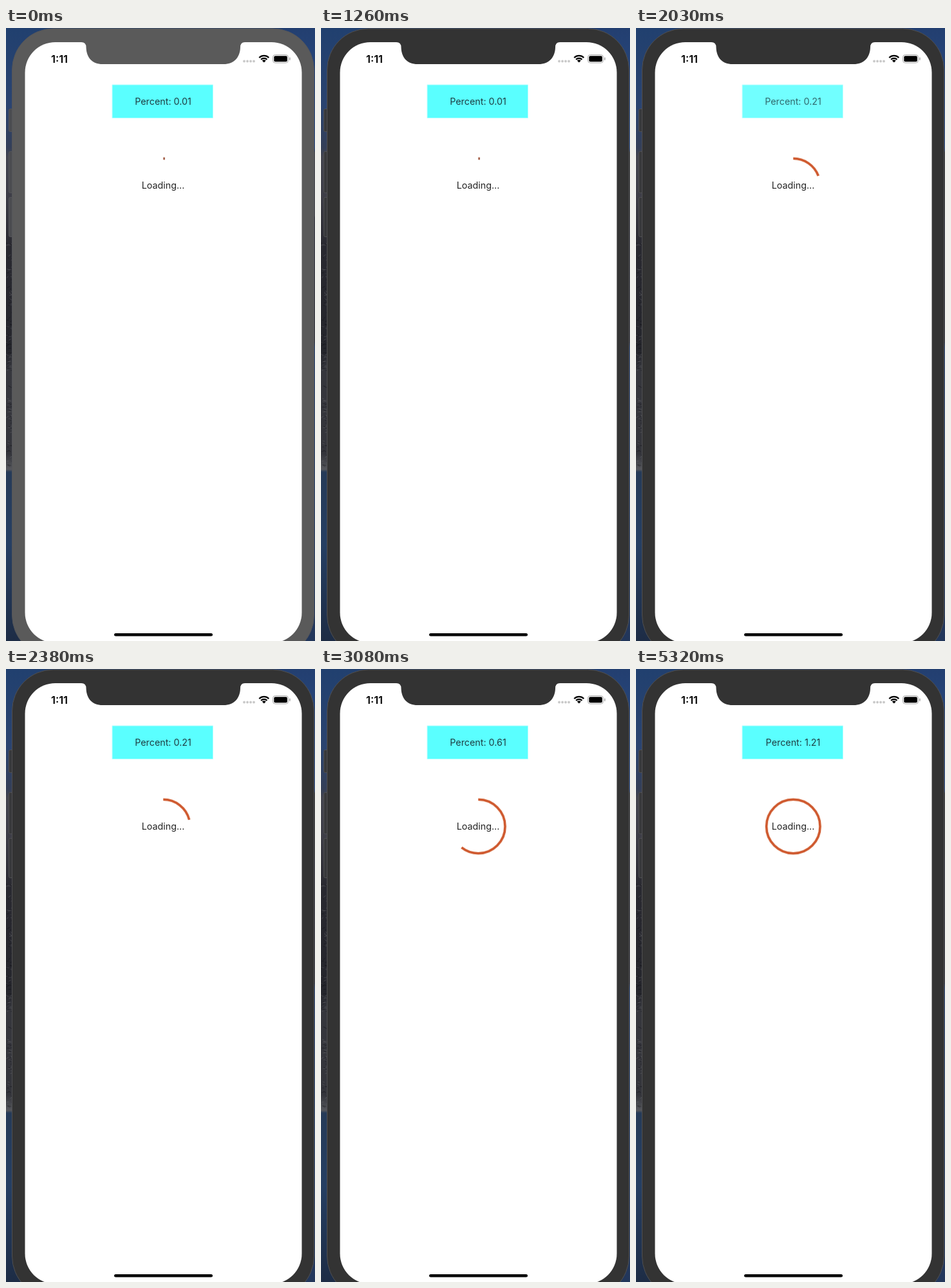
An HTML page with a canvas that plays this animation: 480x950 px, repeating every 5390 ms.

```html
<!DOCTYPE html>
<html lang="en">
<head>
<meta charset="utf-8">
<title>Circular progress</title>
<style>
  html, body { margin: 0; width: 100%; height: 100%; overflow: hidden; background: #26364f; }
  canvas { display: block; width: 480px; height: 950px; }
</style>
</head>
<body>
<canvas id="stage" width="480" height="950"></canvas>
<script>
const ctx = document.getElementById('stage').getContext('2d');
const LOOP = 5390, STEP = 70;
const FOCUS_AT = 1190;                              // simulator window becomes active
const TAPS = [1813, 2483, 2750, 3240, 3690, 4115];  // moments the button is released
const DOWN = -80, UP = 60, FADE_IN = 250, DIM = 0.2;
const SPRING = 18.5;

const clamp = x => Math.min(1, Math.max(0, x));
const mix = (a, b, k) => a + (b - a) * k;
const ease = x => {
  x = clamp(x);
  return x < 0.5 ? 2 * x * x : 1 - 2 * (1 - x) * (1 - x);
};

function percentAt(t) {
  return 0.01 + 0.2 * TAPS.filter(tap => t >= tap).length;
}

// Each tap adds one critically damped spring.
function arcAt(t) {
  let value = 0.01;
  TAPS.forEach((tap, i) => {
    const k = SPRING * Math.max(0, t - tap) / 1000;
    const change = Math.min(1, 0.21 + 0.2 * i) - Math.min(1, 0.01 + 0.2 * i);
    value += change * (1 - (1 + k) * Math.exp(-k));
  });
  return value;
}

function opacityAt(t) {
  const rise = (i, at) => i < 0 ? 1 : mix(DIM, 1, ease((at - TAPS[i] - UP) / FADE_IN));
  const i = TAPS.filter(tap => t >= tap + DOWN).length - 1;
  if (i < 0 || t >= TAPS[i] + UP) return rise(i, t);
  const start = TAPS[i] + DOWN;
  return mix(rise(i - 1, start), DIM, ease((t - start) / (UP - DOWN)));
}

function box(x, y, w, h, r, fill, stroke) {
  ctx.beginPath();
  ctx.roundRect(x, y, w, h, r);
  if (fill) { ctx.fillStyle = fill; ctx.fill(); }
  if (stroke) { ctx.strokeStyle = stroke; ctx.lineWidth = 1; ctx.stroke(); }
}

function label(text, x, y, size, weight, color) {
  ctx.font = `${weight} ${size}px Inter, sans-serif`;
  ctx.textAlign = 'center';
  ctx.fillStyle = color;
  ctx.fillText(text, x, y);
}

function verticalGradient(stops) {
  const g = ctx.createLinearGradient(0, 0, 0, 950);
  stops.forEach(([y, color]) => g.addColorStop(y / 950, color));
  return g;
}

const leftTones = verticalGradient([
  [0, '#21406f'], [120, '#2b4470'], [185, '#343f58'], [200, '#44454f'], [260, '#3e3e47'],
  [340, '#292930'], [500, '#25262c'], [530, '#36373d'], [660, '#34353b'], [684, '#55575c'],
  [688, '#263b58'], [800, '#263f63'], [950, '#1d2c45']
]);
const rightTones = verticalGradient([
  [0, '#233f70'], [185, '#2c4f8c'], [195, '#3a3b45'], [485, '#36373f'],
  [495, '#2b4675'], [700, '#29436d'], [950, '#22365a']
]);

function wallpaper() {
  ctx.fillStyle = leftTones;
  ctx.fillRect(0, 0, 240, 950);
  ctx.fillStyle = rightTones;
  ctx.fillRect(240, 0, 240, 950);
  let seed = 11;
  const rnd = () => (seed = (seed * 16807) % 2147483647) / 2147483647;
  for (let i = 0; i < 130; i++) {
    const x = rnd() * 10, y = 330 + rnd() * 350;
    ctx.strokeStyle = rnd() < 0.5 ? 'rgba(125,125,130,.3)' : 'rgba(12,12,16,.4)';
    ctx.lineWidth = 1;
    ctx.beginPath();
    ctx.moveTo(x, y);
    ctx.lineTo(x + 2 + rnd() * 3, y + rnd() * 6 - 3);
    ctx.stroke();
  }
}

function phone(active) {
  const body = active ? '#333333' : '#5a5a5a';
  const key = active ? '#38393b' : '#4b4c50';
  const rim = active ? '#505052' : '#55565a';
  [[125, 35], [191, 64], [262, 61]].forEach(([y, h]) => box(4.5, y + 0.5, 10, h, 2, key, rim));
  box(470, 191, 10, 102, 2, key);
  box(9.5, 1, 469, 973, 64, body, rim);
  box(29.5, 22, 430, 931, 47, '#ffffff');

  ctx.beginPath();
  ctx.moveTo(117, 21);
  ctx.lineTo(117, 22);
  ctx.quadraticCurveTo(124.5, 22, 124.5, 30);
  ctx.bezierCurveTo(125, 46, 134, 56, 150, 56);
  ctx.lineTo(338, 56);
  ctx.bezierCurveTo(354, 56, 363.5, 46, 364, 30);
  ctx.quadraticCurveTo(364, 22, 371, 22);
  ctx.lineTo(371, 21);
  ctx.fillStyle = body;
  ctx.fill();
}

function statusBar() {
  label('1:11', 83, 53.5, 16.5, 600, '#000');

  ctx.fillStyle = '#c9c9c9';
  for (let x = 370; x < 388; x += 5) {
    ctx.beginPath();
    ctx.arc(x, 51.5, 1.9, 0, 7);
    ctx.fill();
  }

  const fan = (r, w) => {
    ctx.beginPath();
    ctx.arc(400.8, 53.5, r, -Math.PI * 0.75, -Math.PI * 0.25);
    ctx.lineWidth = w;
    ctx.stroke();
  };
  ctx.strokeStyle = '#000';
  fan(10.6, 2.4);
  fan(6.6, 2.3);
  fan(2.1, 4.2);

  box(414.5, 41.5, 24, 12.5, 3.8, null, '#a9a9a9');
  box(416.3, 43.2, 20.6, 9, 2, '#000');
  box(440, 45.5, 1.6, 4.5, 1, '#a9a9a9');
  box(168, 938, 153, 4.6, 2.3, '#000');
}

function button(t) {
  ctx.save();
  ctx.globalAlpha = opacityAt(t);
  box(164.5, 87.5, 157.5, 52.5, 1, 'rgba(90,255,255,.45)');
  box(165.5, 88.5, 155.5, 50.5, 0, '#5affff');
  label('Percent: ' + percentAt(t).toFixed(2), 244, 119, 14.3, 400, '#1f3d42');
  ctx.restore();
}

function ring(t) {
  const top = -Math.PI / 2;
  ctx.beginPath();
  ctx.arc(244.3, 244, 41.7, top, top + Math.PI * 2 * arcAt(t));
  ctx.strokeStyle = 'rgba(226,150,100,.22)';
  ctx.lineWidth = 5.4;
  ctx.stroke();
  ctx.strokeStyle = t < TAPS[0] ? '#a2604c' : '#cf5a30';
  ctx.lineWidth = 3.5;
  ctx.stroke();
  label('Loading...', 244, 249, 14.3, 400, '#222');
}

function draw(t) {
  wallpaper();
  phone(t >= FOCUS_AT);
  statusBar();
  button(t);
  ring(t);
}

const begin = performance.now();
function tick() {
  const t = (performance.now() - begin) % LOOP;
  draw(Math.floor(t / STEP) * STEP);
  requestAnimationFrame(tick);
}
tick();
</script>
</body>
</html>
```
